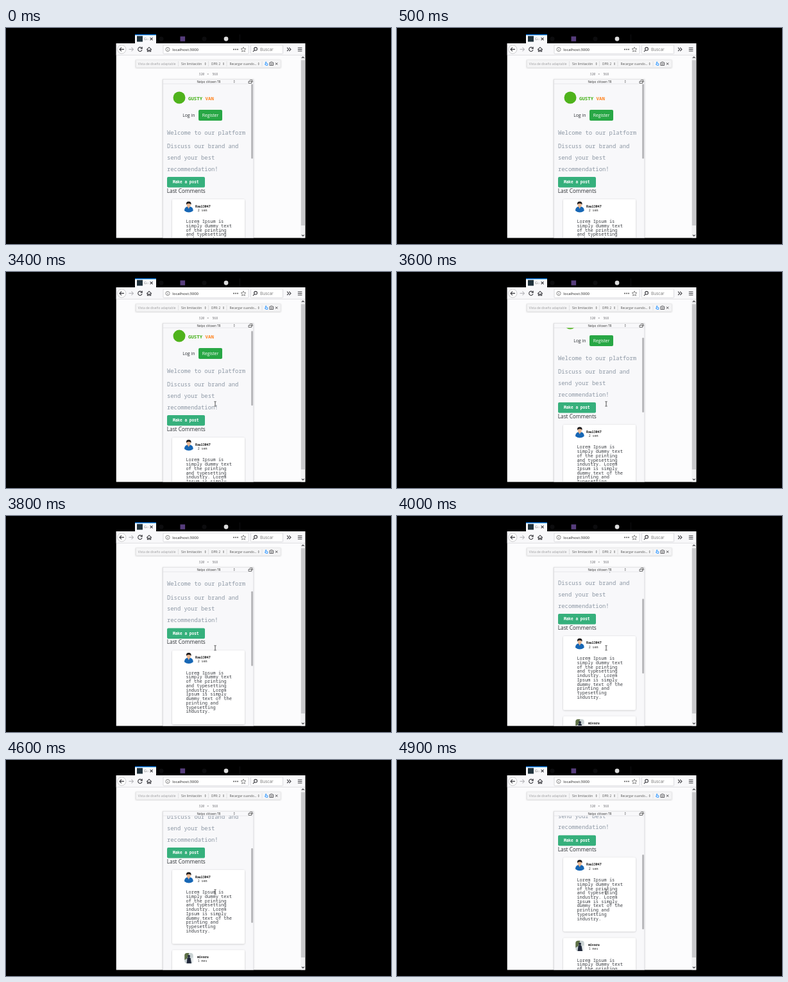
These frames come from a looping animation (600 px wide and 338 px high, 5 s). An HTML page:

```html
<!DOCTYPE html>
<html lang="es">
<head>
<meta charset="utf-8">
<title>Demo</title>
<style>
html, body { margin: 0; width: 100%; height: 100%; overflow: hidden; background: #000; }
svg { display: block; width: 100%; height: 100%; }
text { font-family: "Open Sans", sans-serif; white-space: pre; }
.mono { font-family: "Noto Sans Mono", "DejaVu Sans Mono", monospace; }
.line { fill: none; stroke: #3a3a3f; stroke-width: 1.1; }
.thin { fill: none; stroke: #555; stroke-width: .7; }
</style>
</head>
<body>
<svg viewBox="0 0 600 338" xmlns="http://www.w3.org/2000/svg">
  <defs>
    <clipPath id="view"><rect x="245" y="87.5" width="140.5" height="240.5"/></clipPath>
    <clipPath id="win"><rect x="171.5" y="24" width="295" height="304.5"/></clipPath>
    <linearGradient id="fade"><stop offset=".2" stop-color="#666"/><stop offset="1" stop-color="#ddd"/></linearGradient>
    <filter id="soft" x="-10%" y="-10%" width="120%" height="125%">
      <feDropShadow dx="0" dy=".6" stdDeviation="1" flood-opacity=".25"/>
    </filter>
  </defs>
  <rect width="600" height="338"/>

  <!-- tab strip -->
  <rect x="201" y="10" width="33" height="14" fill="#f9f9fb"/>
  <rect x="201" y="10" width="33" height="1.3" fill="#0a84ff"/>
  <rect x="204" y="12.5" width="9" height="9" fill="#20323c"/>
  <text x="215" y="19.3" font-size="5.8" fill="url(#fade)">Gu</text>
  <path class="line" d="M224.6 15.2l4 4m0-4l-4 4"/>
  <circle cx="242" cy="17" r="3.5" fill="#0c0c0e"/>
  <rect x="271.5" y="13.2" width="7.6" height="7.6" fill="#563d7c"/>
  <circle cx="309" cy="17" r="3.5" fill="#0c0c0e"/>
  <circle cx="343" cy="17" r="3.4" fill="#dcdcdc"/>
  <path d="M364.5 10v14" stroke="#151518" stroke-width=".7"/>

  <g clip-path="url(#win)">
    <rect x="171.5" y="24" width="295" height="305" fill="#fcfcfd"/>
    <rect x="171.5" y="24" width="295" height="18.3" fill="#f8f8fa"/>
    <path d="M171.5 42.4h295" stroke="#d5d5d8" stroke-width=".7"/>

    <!-- navigation -->
    <circle cx="180.3" cy="33.4" r="6.6" fill="#fff" stroke="#b8b8bb" stroke-width=".7"/>
    <path class="line" d="M184 33.4h-7m3-3l-3 3 3 3"/>
    <path class="line" style="stroke:#b9b9bd" d="M191.5 33.4h7m-3-3l3 3-3 3"/>
    <path class="line" d="M211.6 31.6a3.2 3.2 0 1 0 .4 2.6M212.2 29.6v2.6h-2.8"/>
    <path class="line" d="M219.2 33.8l3.8-3.6 3.8 3.6M220.4 33v3.8h1.7v-2.2h1.8v2.2h1.7V33"/>
    <rect x="245" y="26.6" width="133" height="13.8" rx="1" fill="#fff" stroke="#cfcfd3" stroke-width=".7"/>
    <circle class="thin" cx="252" cy="33.5" r="3.1"/>
    <path class="thin" d="M252 33v2.2m0-3.6v.7"/>
    <text x="259.3" y="35.8" font-size="6.05" fill="#222">localhost:3000</text>
    <g fill="#444"><circle cx="355" cy="33.5" r=".9"/><circle cx="358" cy="33.5" r=".9"/><circle cx="361" cy="33.5" r=".9"/></g>
    <path class="thin" d="M370 29.8l1.1 2.5 2.7.3-2 1.9.6 2.7-2.4-1.4-2.4 1.4.6-2.7-2-1.9 2.7-.3z"/>
    <rect x="381.5" y="26.6" width="50" height="13.8" rx="1" fill="#fff" stroke="#cfcfd3" stroke-width=".7"/>
    <path class="line" d="M387.2 34.9l-2.4 2.3"/><circle class="line" cx="389" cy="32.8" r="2.4"/>
    <text x="396" y="35.9" font-size="6.5" fill="#777">Buscar</text>
    <path class="line" d="M438 30.7l2.7 2.7-2.7 2.7m3.2-5.4l2.7 2.7-2.7 2.7"/>
    <path class="line" d="M454.8 31h6.6m-6.6 2.5h6.6m-6.6 2.5h6.6"/>

    <!-- page scrollbar -->
    <rect x="459.4" y="42.8" width="7.2" height="286" fill="#f1f1f2"/>
    <rect x="459.8" y="50.4" width="6.4" height="258.6" fill="#c9c9cb"/>
    <path class="line" d="M460.9 47.2l1.9-1.9 1.9 1.9M460.9 323.6l1.9 1.9 1.9-1.9"/>

    <!-- device toolbar -->
    <rect x="202.5" y="50" width="225.5" height="11.8" fill="#f5f5f6" stroke="#dedee0" stroke-width=".5" filter="url(#soft)"/>
    <g font-size="4.92" fill="#555">
      <text x="205.8" y="57.7" fill="#9b9b9e">Vista de diseño adaptable</text>
      <text x="273" y="57.7" font-size="5.2">Sin limitación</text>
      <text x="320" y="57.7" font-size="4.7">DPR: 2</text>
      <text x="348.6" y="57.7" font-size="4.85">Recargar cuando…</text>
    </g>
    <path d="M268.5 52v8M315.5 52v8M344 52v8M399 52v8" stroke="#d4d4d7" stroke-width=".6"/>
    <path id="spin" d="M-1.2-.6L0-2.2 1.2-.6zM-1.2.6L0 2.2 1.2.6z" transform="translate(310.7 56)" fill="#777"/>
    <use href="#spin" x="28.3"/><use href="#spin" x="83"/>
    <path d="M404.4 57.2v-3.6a.7.7 0 0 1 1.4 0v1.7l2 .5v2.6h-2.9l-1.6-1.8z" fill="#d7eaff" stroke="#0a84ff" stroke-width=".7"/>
    <path class="line" style="stroke-width:.8" d="M410.9 54h1.4l.6-.9h1.6l.6.9h1.4v4.5h-5.6z"/>
    <circle class="thin" cx="413.7" cy="56.2" r="1.1"/>
    <path class="line" style="stroke-width:.9" d="M420 54.4l3.2 3.2m0-3.2l-3.2 3.2"/>
    <g font-size="4.8" fill="#77777b" class="mono">
      <text class="mono" x="300.6" y="73.6">320</text><text class="mono" x="313.3" y="73.6">×</text><text class="mono" x="321.4" y="73.6">568</text>
    </g>

    <!-- device frame -->
    <rect x="244.6" y="80.2" width="141.2" height="260" fill="#f8f8fa" stroke="#d6d6d9" stroke-width=".6" filter="url(#soft)"/>
    <path d="M245 87.3h140.5" stroke="#dcdce0" stroke-width=".6"/>
    <text x="297.4" y="85.8" font-size="4.7" fill="#333">Nelpo oVoxen TR</text>
    <use href="#spin" x="45" y="27.8"/>
    <path class="thin" style="stroke:#333" d="M378 83.4h4.6v3H378zM379.3 82.4l1.3-1.2h3.2v3.2m-1-.9l1 1.2 1-1.2"/>

    <g clip-path="url(#view)">
      <g id="page"></g>
      <rect id="thumb" x="382" y="87.6" width="3" height="117" rx="1.4" fill="#b9b9bc"/>
    </g>
  </g>
  <path id="arrow" d="M0 0v8l1.9-1.7 1.3 3 1.3-.6-1.3-2.8h2.5z" fill="#fff" stroke="#222" stroke-width=".6"/>
  <path id="beam" d="M-1.6-3.6H-.5L0-3.2.5-3.6H1.6M0-3.2V3.2M-1.6 3.6H-.5L0 3.2.5 3.6H1.6" fill="none" stroke="#222" stroke-width=".8"/>
</svg>
<script>
const LOOP = 5000, STEP = 100;
const $ = id => document.getElementById(id);
const clamp = v => Math.min(1, Math.max(0, v));

const text = (x, y, size, fill, str, extra = '') =>
  `<text x="${x}" y="${y}" font-size="${size}" fill="${fill}" ${extra}>${str}</text>`;
const MONO = 'class="mono"', BOLD = MONO + ' font-weight="700"', MEDIUM = MONO + ' font-weight="500"';
const box = (x, y, w, h, fill, extra = '') =>
  `<rect x="${x}" y="${y}" width="${w}" height="${h}" fill="${fill}" ${extra}/>`;

const LOREM = ['Lorem Ipsum is', 'simply dummy text', 'of the printing', 'and typesetting',
  'industry. Lorem', 'Ipsum is simply', 'dummy text of the', 'printing and', 'typesetting', 'industry.'];

const bust = `<path d="M278 18c0-4 2-6 4.500-6.500h4.500c3 .5 4.700 2.500 4.700 6.500q-6.800 5-13.700 0z" fill="#1767b5"/>
  <path d="M282.600 11h4.200l-2.100 4z" fill="#e3b08c"/>
  <ellipse cx="284.700" cy="8.600" rx="3.100" ry="3.800" fill="#e9b995"/>
  <path d="M281 8.500q-.8-5 3.700-5t3.800 5q-1-2-3.800-2t-3.700 2z" fill="#1c1a1c"/>`;
const snapshot = box(278.3, 4.3, 13.4, 16.4, '#c9d2d3', 'rx="4"') +
  `<path d="M278.300 8q0-3.700 4-3.700h3l-2.500 8-4.500 3z" fill="#5e7046"/>
  <path d="M281.500 20.700l1-8q2.500-3.500 5 0l1.500 8z" fill="#20283a"/>
  <circle cx="285" cy="9.300" r="2" fill="#20283a"/>
  <path d="M289 12h2.700v6l-2 2z" fill="#eef1f2"/>`;

function card(y, avatar, name, age) {
  const mid = 'text-anchor="middle"';
  return `<g transform="translate(0 ${y})">` +
    box(259, 0, 113, 115.5, '#fff', 'rx="2" filter="url(#soft)"') + avatar +
    text(306.8, 12.5, 4.95, '#111', name, BOLD + mid) +
    text(306, 18.9, 4.9, '#333', age, MONO + mid) +
    LOREM.map((s, i) => text(280.4, 37.3 + 6.73 * i, 7.02, '#3c3f44', s, MONO)).join('') + '</g>';
}

const GREY = '#8c97a4';
$('page').innerHTML =
  '<circle cx="270" cy="109" r="9.500" fill="#4fb31c"/>' +
  text(284, 113.2, 7.4, '#3fae12', 'GUSTY <tspan fill="#ff8420">VAN</tspan>', BOLD) +
  text(275.2, 139.3, 6.85, '#2b2f33', 'Log in') +
  box(300, 128, 37, 17, '#28a745', 'rx="2"') +
  text(305.8, 139.3, 6.75, '#fff', 'Register') +
  [['Welcome to our platform', 167], ['Discuss our brand and', 188.2], ['send your best', 206], ['recommendation!', 223.6]]
    .map(([s, y]) => text(251, y, 8.85, GREY, s, MEDIUM)).join('') +
  box(251, 233, 59, 16.5, '#36b07c', 'rx="2"') +
  text(260, 243.4, 6.15, '#fff', 'Make a post', BOLD) +
  text(250.8, 258.1, 8.25, '#2b2f33', 'Last Comments') +
  card(268, bust, 'Raul3047', '2 sem') +
  card(393.6, snapshot, 'mivaru', '1 mes');

// One wheel notch scrolls the page this far.
const NOTCH = 19.2;
function scrollAt(t) {
  const speedUp = clamp((t - 3200) / 600) ** 1.7;
  const slowDown = 1 - (1 - clamp((t - 3800) / 600)) ** 2.16;
  const last = clamp((t - 4700) / 200);
  return NOTCH * (3 * speedUp + 2 * slowDown + last);
}

function draw(time) {
  const t = Math.floor(time % LOOP / STEP) * STEP;
  const y = scrollAt(t);
  $('page').setAttribute('transform', `translate(0 ${-y})`);
  $('thumb').setAttribute('transform', `translate(0 ${y * .525})`);

  const move = 1 - (1 - clamp((t - 2700) / 300)) ** 2;
  const cx = 394.7 + (326 - 394.7) * move, cy = 195.4 + (206.4 - 195.4) * move;
  const inside = cx < 382;
  $('arrow').style.display = t >= 2600 && !inside ? '' : 'none';
  $('beam').style.display = t >= 2600 && inside ? '' : 'none';
  for (const id of ['arrow', 'beam']) $(id).setAttribute('transform', `translate(${cx} ${cy})`);
}

const start = performance.now();
function tick() {
  draw(performance.now() - start);
  requestAnimationFrame(tick);
}
tick();
</script>
</body>
</html>
```
